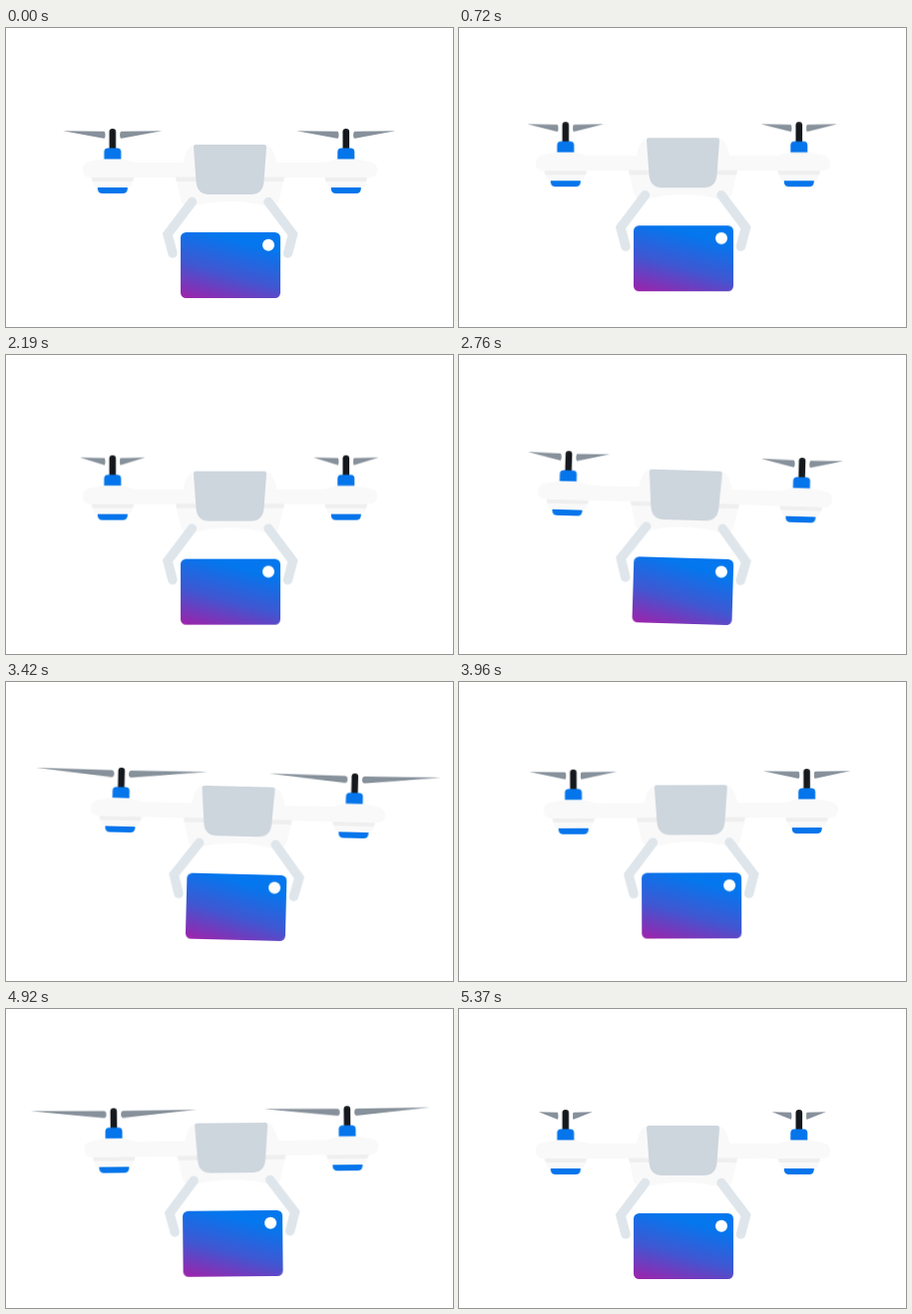
An HTML page that plays this animation: 448 by 300 pixels, repeating every 5.4 s.

```html
<!DOCTYPE html>
<html lang="en">
<head>
<meta charset="utf-8">
<title>Delivery drone</title>
<style>
  html, body { margin: 0; width: 100%; height: 100%; overflow: hidden; background: #fff; }
  svg { display: block; width: 448px; height: 300px; }

  .lift, .drift, .tilt {
    animation: 5400ms cubic-bezier(.37, 0, .63, 1) infinite;
  }
  .lift  { animation-name: lift; }
  .drift { animation-name: drift; }
  .tilt  { animation-name: tilt; transform-origin: 224px 150px; }
  .blade { animation: spin 90ms linear infinite alternate; transform-origin: 0 0; }

  @keyframes lift {
    0%, 43.333%, 46.667%, 100% { transform: translateY(0); }
    21.667% { transform: translateY(-10px); }
    68.889% { transform: translateY(-14.3px); }
  }
  @keyframes drift {
    0%, 43.333%, 100% { transform: translateX(0); }
    67.778% { transform: translateX(8.5px); }
  }
  @keyframes tilt {
    0%, 43.333%, 100% { transform: rotate(0deg); }
    54.444% { transform: rotate(2.1deg); }
    83.333% { transform: rotate(-1deg); }
  }
  @keyframes spin {
    from { transform: scaleX(1); }
    to   { transform: scaleX(.1); }
  }

  .hull  { fill: #f9f9f9; }
  .band  { fill: #efefef; }
  .blue  { fill: #0575eb; }
  .metal { fill: #87919b; }
  .claw  { fill: none; stroke: #dfe6eb; stroke-width: 9.5; stroke-linecap: round; }
</style>
</head>
<body>
<svg viewBox="0 0 448 300">
  <defs>
    <linearGradient id="paint" gradientUnits="userSpaceOnUse" x1="175" y1="271" x2="193" y2="203">
      <stop offset="0" stop-color="#a021aa"/>
      <stop offset=".5" stop-color="#4057d2"/>
      <stop offset="1" stop-color="#0477ee"/>
    </linearGradient>

    <!-- Rotor and motor, centred on x = 0 -->
    <g id="motor">
      <g transform="translate(-7.3 0)">
        <path class="blade metal" d="M-84.5 103.2 L-3 103.8 Q0 104 0 107.4 Q0 111 -3.6 110.8 Z"/>
      </g>
      <g transform="translate(7.3 0) scale(-1 1)">
        <path class="blade metal" d="M-84.5 103.2 L-3 103.8 Q0 104 0 107.4 Q0 111 -3.6 110.8 Z"/>
      </g>
      <rect x="-3.3" y="101" width="6.6" height="24" rx="3.3" fill="#15191d"/>
      <path class="blue" d="M-8.5 132 V124.5 Q-8.5 120.5 -4.5 120.5 H4.5 Q8.5 120.5 8.5 124.5 V132 Z"/>
      <path class="hull" d="M-21.5 149 H21.5 L19 157 Q18 160 15 160 H-15 Q-18 160 -19 157 Z"/>
      <path class="band" d="M-21.5 149.5 H21.5 L20.2 154 H-20.2 Z"/>
      <path class="blue" d="M-15 160 H15 V161 Q15 166 10 166 H-10 Q-15 166 -15 161 Z"/>
    </g>

    <path id="claw" class="claw" d="M186.5 174.5 L162 207 L167 226"/>
  </defs>

  <g class="lift"><g class="drift"><g class="tilt">
    <use href="#motor" x="106.8"/>
    <use href="#motor" x="340.8"/>

    <path class="hull" d="M84 134 L97 131.5 H116 L130 135 H319 L332 131.5 H351 L364 134 Q372 135 372 142 Q372 150 364 150 H84 Q77 150 77 142 Q77 135 84 134 Z"/>
    <path class="hull" d="M190 117 H259 Q268 118 271 134 L279 150 L274 172 Q273 179 263 179 Q224.500 169 186 179 Q176 179 175 172 L170 150 L178 134 Q181 118 190 117 Z"/>
    <path class="band" d="M170 149.500 H279 L278 154 H171 Z"/>
    <path d="M190 117 H259 Q261.200 117 261 119.500 L258.500 154 Q257.500 167 245 167 H204 Q191.500 167 190.500 154 L188 119.500 Q187.800 117 190 117 Z" fill="#cdd5dd"/>

    <use href="#claw"/>
    <use href="#claw" transform="translate(449.500 0) scale(-1 1)"/>

    <rect x="175" y="205" width="100" height="66" rx="5.500" fill="url(#paint)"/>
    <circle cx="263" cy="217.700" r="6" fill="#fff"/>
  </g></g></g>
</svg>
</body>
</html>
```
